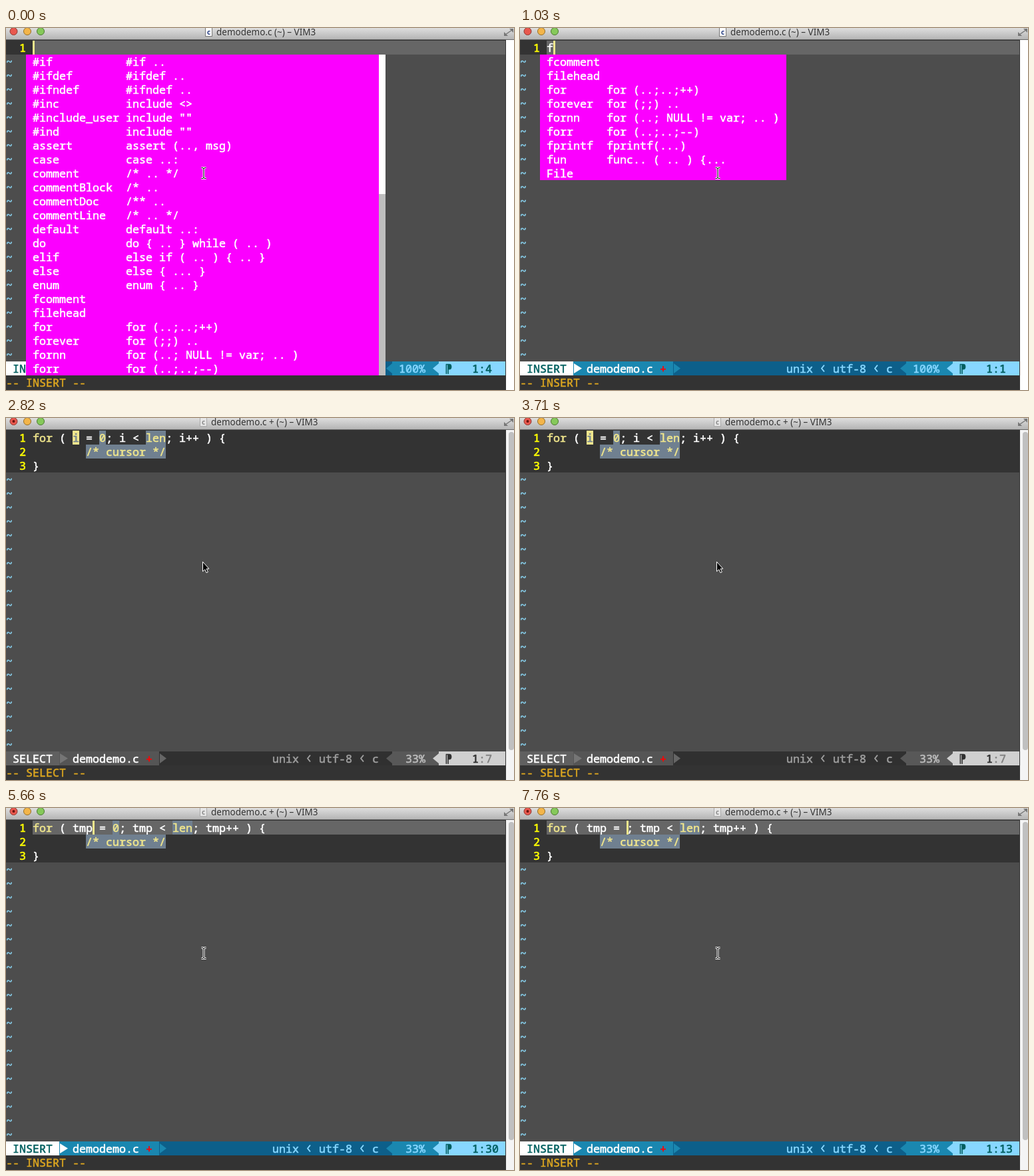
An HTML page with a canvas that plays this animation: 763x545 px, repeating every 8000 ms.

```html
<!DOCTYPE html>
<html lang="en">
<head>
<meta charset="utf-8">
<title>Snippet completion</title>
<style>
html, body { margin: 0; width: 100%; height: 100%; overflow: hidden; background: #fff; }
canvas { display: block; }
</style>
</head>
<body>
<canvas width="763" height="545"></canvas>
<script>
const ctx = document.querySelector('canvas').getContext('2d');
const LOOP = 8000, CELL = 10, ROW = 21, TOP = 19, RIGHT = 750, STATUS = 23;
const MONO = '500 16.6667px "Noto Sans Mono", "DejaVu Sans Mono", monospace';
const KHAKI = '#f0e68c', SLATE = '#708090', OLIVE = '#6b8e23', DARK = '#333', MAGENTA = '#fb00ff';

const forItems = ['for|for (..;..;++)', 'forever|for (;;) ..',
  'fornn|for (..; NULL != var; .. )', 'forr|for (..;..;--)'];
const allMenu = { width: 530, column: 180, bar: true, items: [
  '#if|#if ..', '#ifdef|#ifdef ..', '#ifndef|#ifndef ..', '#inc|include <>',
  '#include_user|include ""', '#ind|include ""', 'assert|assert (.., msg)',
  'case|case ..:', 'comment|/* .. */', 'commentBlock|/* ..', 'commentDoc|/** ..',
  'commentLine|/* .. */', 'default|default ..:', 'do|do { .. } while ( .. )',
  'elif|else if ( .. ) { .. }', 'else|else { ... }', 'enum|enum { .. }',
  'fcomment|', 'filehead|', ...forItems] };
const fMenu = { width: 370, column: 130, items: ['fcomment|', 'filehead|', ...forItems,
  'fprintf|fprintf(...)', 'fun|func.. ( .. ) {...', 'File|'] };
const forMenu = { width: 360, column: 120, items: forItems };

// Markup: `keyword`, [placeholder], @selected placeholder@
const loop = (first, init, name) => '`for` ( ' + first + ' = ' + init + '; ' + name + ' < [len]; ' + name + '++ ) {';
const scenes = [
  { at: 0, code: '', cursor: 40, pos: '1:4', menu: allMenu },
  { at: 1030, code: 'f', cursor: 50, pos: '1:1', menu: fMenu },
  { at: 1180, code: 'fo', cursor: 60, pos: '1:2', menu: forMenu },
  { at: 1330, code: '`for`', cursor: 70, pos: '1:3', menu: forMenu },
  { at: 2820, code: loop('@i@', '[0]', 'i'), select: true, pos: '1:7' },
  { at: 5360, code: loop('t', '[0]', 'i'), select: true, cursor: 110, pos: '1:7' },
  { at: 5510, code: loop('tm', '[0]', 'tm'), cursor: 120, pos: '1:27' },
  { at: 5660, code: loop('tmp', '[0]', 'tmp'), cursor: 130, pos: '1:30' },
  { at: 6410, code: loop('tmp', '@0@', 'tmp'), select: true, pos: '1:13' },
  { at: 7310, code: loop('tmp', '1', 'tmp'), cursor: 170, pos: '1:14' },
  { at: 7760, code: loop('tmp', '', 'tmp'), cursor: 160, pos: '1:13' },
];
const cursorHidden = [[590, 740], [1930, 2230], [3420, 3710], [4160, 4310], [4760, 5060], [7010, 7310]];

const insertColors = { mode: '#fff', modeText: '#005f5f', file: '#1a87b0', fileText: '#fff', middle: '#0d5f8a',
  info: '#87d7ff', percent: '#1a87b0', percentText: '#87d7ff', end: '#87d7ff', line: '#005f5f', col: '#005f5f' };
const selectColors = { mode: '#606060', modeText: '#fff', file: '#555', fileText: '#fff', middle: '#303030',
  info: '#9e9e9e', percent: '#585858', percentText: '#bcbcbc', end: '#d0d0d0', line: '#303030', col: '#808080' };

function rect(x, y, w, h, color) {
  ctx.fillStyle = color;
  ctx.fillRect(x, y, w, h);
}

function shape(points, fill, stroke, width = 1) {
  ctx.beginPath();
  for (let i = 0; i < points.length; i += 2) ctx.lineTo(points[i], points[i + 1]);
  if (fill) { ctx.closePath(); ctx.fillStyle = fill; ctx.fill(); }
  if (stroke) { ctx.strokeStyle = stroke; ctx.lineWidth = width; ctx.stroke(); }
}

function disc(x, y, r, color, edge) {
  ctx.beginPath();
  ctx.arc(x, y, r, 0, 2 * Math.PI);
  ctx.fillStyle = color;
  ctx.fill();
  if (edge) { ctx.strokeStyle = edge; ctx.lineWidth = 1; ctx.stroke(); }
}

const rowTop = row => TOP + row * ROW;

// A thin outline gives the text its semi-bold weight.
function text(str, x, row, color) {
  const y = rowTop(row) + 17;
  ctx.font = MONO;
  ctx.fillStyle = ctx.strokeStyle = color;
  ctx.lineWidth = 0.6;
  ctx.lineJoin = 'round';
  ctx.fillText(str, x, y);
  ctx.strokeText(str, x, y);
}

function drawCode(src, row, x, cursorOn) {
  for (const part of src.split(/(`.+?`|@.+?@|\[.+?\])/)) {
    const mark = part && '`@['.includes(part[0]) ? part[0] : '';
    const str = mark ? part.slice(1, -1) : part;
    const width = str.length * CELL;
    let color = mark ? KHAKI : '#fff';
    if (mark === '[') rect(x, rowTop(row), width, ROW, SLATE);
    if (mark === '@') {
      rect(x, rowTop(row), width, ROW, cursorOn ? KHAKI : OLIVE);
      if (cursorOn) color = SLATE;
    }
    text(str, x, row, color);
    x += width;
  }
}

function drawTitle(expanded) {
  const fade = ctx.createLinearGradient(0, 0, 0, 17);
  fade.addColorStop(0, '#dedede');
  fade.addColorStop(1, '#b4b4b4');
  rect(0, 0, 763, 17, fade);
  rect(0, 17, 763, 1, '#666');
  disc(11.5, 5, 5.5, '#e8584e', '#8e3a34');
  disc(32, 5, 5.5, '#f3b54a', '#96702c');
  disc(52, 5, 5.5, '#86c95a', '#4d7a34');
  if (expanded) disc(11.5, 5, 2, '#6a1510');
  const x = expanded ? 308 : 316, ink = expanded ? '#8a8a8a' : '#223a80';
  rect(x - 17, 0, 11, 13, expanded ? '#aaa' : '#777');
  rect(x - 16, 0, 9, 12, expanded ? '#e6e6e6' : '#fff');
  ctx.font = 'bold 10px "Noto Sans", sans-serif';
  ctx.fillStyle = ink;
  ctx.fillText('c', x - 14, 10);
  ctx.font = '13.5px "Noto Sans", sans-serif';
  ctx.fillStyle = '#333';
  ctx.fillText('demodemo.c ' + (expanded ? '+ ' : '') + '(~) – VIM3', x, 11);
  shape([756, 1, 762, 1, 762, 7], '#777');
  shape([748, 6, 748, 12, 754, 12], '#777');
  shape([750, 10, 760, 3], null, '#777', 1.5);
}

function drawStatus(scene) {
  const c = scene.select ? selectColors : insertColors;
  const y = rowTop(STATUS), mid = y + 10.5;
  const mode = scene.select ? 'SELECT' : 'INSERT';
  const arrow = (base, tip, color) => shape([base, mid - 7.5, tip, mid, base, mid + 7.5], color);
  const chevron = x => shape([x + 7, mid - 5, x + 3, mid, x + 7, mid + 5], null, c.info, 2);

  rect(0, y, 80, ROW, c.mode);
  rect(80, y, 150, ROW, c.file);
  rect(230, y, 350, ROW, c.middle);
  rect(580, y, 70, ROW, c.percent);
  rect(650, y, 100, ROW, c.end);
  arrow(81, 93, scene.select ? '#757575' : '#fff');
  arrow(231, 241, scene.select ? '#666' : c.file);
  arrow(580, 571, c.percent);
  arrow(650, 641, c.end);
  text(mode, 10, STATUS, c.modeText);
  text('demodemo.c', 100, STATUS, c.fileText);
  text('+', 210, STATUS, '#f00');
  text('unix', 400, STATUS, c.info);
  chevron(450);
  text('utf-8', 470, STATUS, c.info);
  chevron(530);
  text('c', 550, STATUS, c.info);
  const percent = scene.at < 2820 ? '100%' : '33%';
  text(percent, 630 - percent.length * CELL, STATUS, c.percentText);
  text('⁋', 660, STATUS, c.line);
  text('1', 700, STATUS, c.line);
  text(scene.pos.slice(1), 710, STATUS, c.col);
  text('-- ' + mode + ' --', 0, STATUS + 1, '#daa520');
}

function drawMenu({ width, column, items, bar }) {
  rect(30, rowTop(1), width, items.length * ROW, MAGENTA);
  if (bar) {
    rect(30 + width, rowTop(1), CELL, 10 * ROW, '#fff');
    rect(30 + width, rowTop(11), CELL, 13 * ROW, '#bebebe');
  }
  items.forEach((item, i) => {
    const [name, hint] = item.split('|');
    text(name, 40, i + 1, '#fff');
    text(hint, column, i + 1, '#fff');
  });
}

function drawPointer(arrow) {
  if (arrow) {
    shape([295.5, 216.5, 295.5, 231, 298.8, 228, 301, 233, 303.3, 232, 301.2, 227, 305, 227], '#000', '#fff');
    return;
  }
  for (const [color, width] of [['#fff', 3], ['#000', 1]]) {
    shape([297, 212, 297, 225], null, color, width);
    shape([293.5, 210.5, 296, 210.5, 297, 212, 298, 210.5, 300.5, 210.5], null, color, width);
    shape([293.5, 226.5, 296, 226.5, 297, 225, 298, 226.5, 300.5, 226.5], null, color, width);
  }
}

function draw(t) {
  const scene = scenes.findLast(s => t >= s.at);
  const cursorOn = !cursorHidden.some(([from, to]) => t >= from && t < to);
  const expanded = scene.at >= 2820;
  const lines = expanded ? 3 : 1;

  rect(0, 0, 763, 545, '#fff');
  rect(0, 17, RIGHT + 1, 528, DARK);
  rect(0, rowTop(lines), RIGHT, (STATUS - lines) * ROW, '#4d4d4d');
  for (let row = lines; row < STATUS; row++) text('~', 0, row, '#87ceeb');
  drawTitle(expanded);
  if (expanded) {
    rect(RIGHT + 1, 18, 12, 527, '#f4f4f4');
    ctx.beginPath();
    ctx.roundRect(755, 21, 8, 479, 4);
    ctx.fillStyle = '#c0c0c0';
    ctx.fill();
  }

  if (!scene.select) rect(40, TOP, RIGHT - 40, ROW, '#666');
  for (let i = 0; i < lines; i++) text(i + 1, 20, i, '#ff0');
  drawCode(scene.code, 0, 40, cursorOn);
  if (expanded) {
    drawCode('[/* cursor */]', 1, 120);
    text('}', 40, 2, '#fff');
  }
  if (scene.cursor && cursorOn) rect(scene.cursor, TOP, 3, ROW, KHAKI);

  drawStatus(scene);
  if (scene.menu) drawMenu(scene.menu);
  drawPointer(scene.select && !scene.cursor);
}

const start = performance.now();
function tick() {
  draw((performance.now() - start) % LOOP);
  requestAnimationFrame(tick);
}
tick();
</script>
</body>
</html>
```
